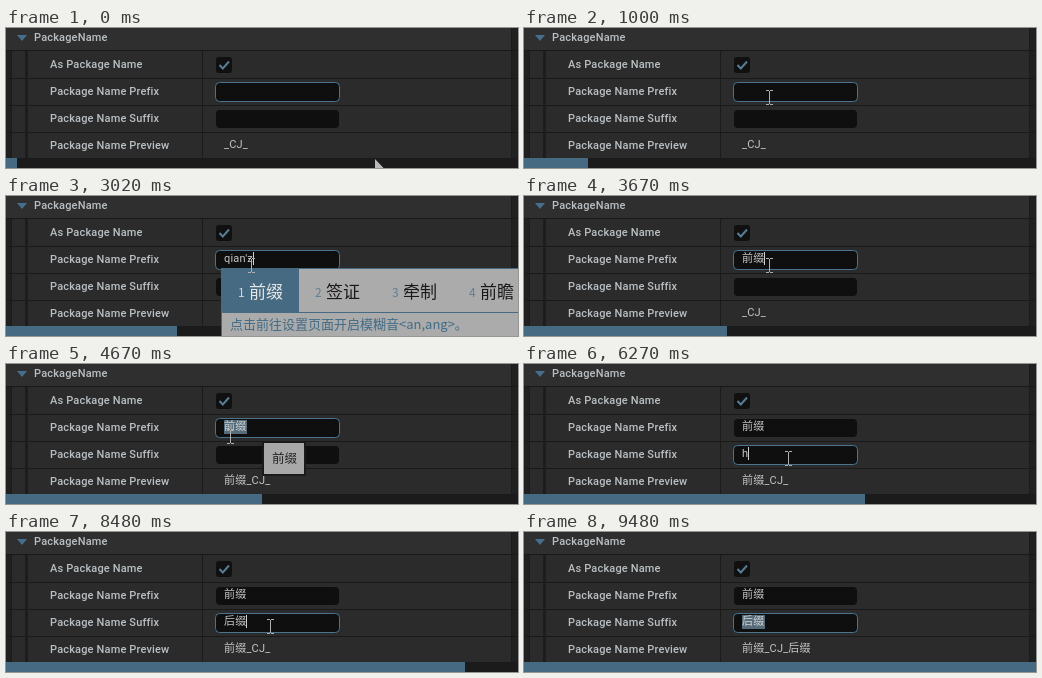
Recreate the animation shown at these times as an HTML page with a canvas. Size 512 by 140 pixels, loop 9680 ms.

```html
<!DOCTYPE html>
<html lang="zh-CN">
<head>
<meta charset="utf-8">
<title>PackageName</title>
<style>
html, body { margin: 0; width: 512px; height: 140px; overflow: hidden; background: #1b1b1b; }
canvas { display: block; }
</style>
</head>
<body>
<canvas id="stage" width="512" height="140"></canvas>
<script>
const ctx = document.getElementById('stage').getContext('2d');
const UI = 'Roboto, "Noto Sans CJK SC", "Noto Sans CJK", sans-serif';
const HAN = '"Noto Sans CJK SC", "Noto Sans CJK", sans-serif';
const BLUE = '#456a82';
const STEPS = 48;

// Screen updates come every 200 ms, apart from a few slower ones.
const slow = { 9: 210, 11: 210, 15: 250, 37: 210 };
const starts = [];
let loop = 0;
for (let i = 0; i < STEPS; i++) {
  starts.push(loop);
  loop += slow[i] || 200;
}

// [first step, typed text, candidates]
const prefixKeys = [
  [0, ''], [10, 'q'],
  [11, 'qi', '其 起 期 气'],
  [12, 'qia', '恰 卡 掐 洽'],
  [13, 'qian', '前 钱 千 签'],
  [15, "qian'z", '前缀 签证 牵制 前瞻'],
  [16, "qian'zh", '前缀 签证 牵制 前瞻'],
  [17, "qian'zhui", '前缀 前 钱 千'],
  [18, '前缀']
];
const suffixKeys = [
  [0, ''], [31, 'h'],
  [32, 'ho', '后 或 好 和'],
  [33, 'hou', '后 候 厚 猴'],
  [34, "hou'z", '后者 后缀 后置 候诊'],
  [35, "hou'zh", '后者 后缀 后置 候诊'],
  [38, "hou'zhu", '后主 后注 后缀 厚主'],
  [39, "hou'zhui", '后缀 后坠 后追 厚坠'],
  [41, '后缀']
];
// [step, x, y] of the mouse
const path = [[0, 369, 131], [1, 366, 126], [5, 245, 69], [20, 245, 69], [22, 224, 72],
  [24, 224, 72], [27, 264, 94], [47, 264, 94]];

const at = (keys, n) => keys.filter(k => k[0] <= n).pop();

function mouseAt(n) {
  const i = Math.max(0, path.findIndex(p => p[0] > n) - 1);
  const [a, b] = [path[i], path[i + 1]];
  const u = (n - a[0]) / (b[0] - a[0]);
  const e = u * u * (3 - 2 * u);
  return [a[1] + (b[1] - a[1]) * e, a[2] + (b[2] - a[2]) * e].map(Math.round);
}

function rect(x, y, w, h, fill) {
  ctx.fillStyle = fill;
  ctx.fillRect(x, y, w, h);
}

function round(x, y, w, h, r, fill, stroke) {
  ctx.beginPath();
  ctx.roundRect(x, y, w, h, r);
  ctx.fillStyle = fill;
  ctx.fill();
  if (stroke) {
    ctx.strokeStyle = stroke;
    ctx.lineWidth = 1;
    ctx.stroke();
  }
}

function shape(points, fill) {
  ctx.beginPath();
  points.forEach(([x, y]) => ctx.lineTo(x, y));
  ctx.closePath();
  ctx.fillStyle = fill;
  ctx.fill();
}

function text(s, x, y, color = '#b9bfc3', font = '500 11px ' + UI, gap = 0.16) {
  ctx.font = font;
  ctx.letterSpacing = gap + 'px';
  ctx.fillStyle = color;
  ctx.fillText(s, x, y);
  return ctx.measureText(s).width;
}

const han = (s, x, y, color, size) => text(s, x, y, color, size + 'px ' + HAN, 0);
const value = (s, x, y, color = '#c6c6c6') => text(s, x, y, color, '11px ' + UI, 0.2);

function panel() {
  rect(0, 0, 512, 140, '#1b1b1b');
  rect(0, 0, 505, 22, '#2f2f2f');
  rect(0, 23, 505, 107, '#2b2b2b');
  rect(0, 23, 5, 107, '#202020');
  rect(506, 0, 6, 130, '#202020');
  for (const y of [22, 50, 77, 104]) rect(0, y, 512, 1, '#191919');
  rect(5, 23, 1, 107, '#1b1b1b');
  rect(19, 23, 3, 107, '#1d1d1d');
  rect(196, 23, 1, 107, '#1b1b1b');
  shape([[11, 7], [21, 7], [16, 13]], '#456f8a');
  text('PackageName', 28, 13);
  ['As Package Name', 'Package Name Prefix', 'Package Name Suffix', 'Package Name Preview']
    .forEach((s, i) => text(s, 44, 40 + 27 * i));

  round(210, 29, 16, 16, 3, '#101010');
  ctx.beginPath();
  ctx.moveTo(213.5, 37);
  ctx.lineTo(216.8, 40.5);
  ctx.lineTo(223, 33.5);
  ctx.strokeStyle = '#567d94';
  ctx.lineWidth = 2;
  ctx.stroke();
}

function field(y, typed, focus, caret, selected) {
  if (focus) round(209.5, y + 0.5, 124, 19, 4, '#0f0f0f', '#4a748e');
  else round(210, y + 1, 123, 18, 4, '#0f0f0f');
  if (selected) rect(218, y + 2, 23, 14, '#566c7a');
  const w = value(typed, 218, y + 12, selected ? '#d2d2d2' : undefined);
  if (caret) rect(Math.round(218 + w), y + 2, 1, 13, '#d0d0d0');
}

function popup(y, words) {
  rect(215, y, 297, 140 - y, '#ababab');
  let x = 232;
  words.split(' ').forEach((word, i) => {
    const step = 44 + 16.5 * word.length;
    if (!i) rect(215, y, step + 1, 44, BLUE);
    han(i + 1, x, y + 29, i ? '#5f7f94' : '#d0d8dd', 12);
    han(word, x + 11, y + 29.5, i ? '#1a1a1a' : '#e6e6e6', 17);
    x += step;
  });
  rect(215, y, 297, 1, BLUE);
  rect(215, y + 44, 297, 1, BLUE);
  rect(215, y, 1, 140 - y, BLUE);
  han('点击前往设置页面开启模糊音<an,ang>。', 224, y + 61, '#426b86', 13);
}

function tooltip() {
  rect(256, 77, 44, 35, '#1a1a1a');
  rect(258, 79, 40, 31, '#a8a8a8');
  han('前缀', 266, 99, '#222', 12.5);
}

function pointer(x, y, beam) {
  if (beam) {
    rect(x, y - 6, 1, 13, '#b0b0b0');
    for (const dy of [-7, 7]) {
      rect(x - 3, y + dy, 3, 1, '#b0b0b0');
      rect(x + 1, y + dy, 3, 1, '#b0b0b0');
    }
  } else {
    shape([[x, y], [x, y + 15], [x + 3.5, y + 12], [x + 6, y + 17], [x + 8, y + 16],
      [x + 6, y + 11], [x + 10, y + 10.5]], '#b9b9b9');
  }
}

function draw(n) {
  const [, prefix, words1] = at(prefixKeys, n);
  const [, suffix, words2] = at(suffixKeys, n);
  const onSuffix = n >= 28;
  const chosen = n >= 20 && !onSuffix;
  const done = n >= 46;
  const idle = n < 10 || (n >= 28 && n < 31);
  const caret = idle ? n > 5 && n % 4 > 1 : n !== 36 && n !== 37;

  panel();
  field(54, prefix, !onSuffix, !onSuffix && !chosen && caret, chosen);
  field(81, suffix, onSuffix, onSuffix && !done && caret, done);
  value((n >= 20 ? '前缀' : '') + '_CJ_' + (n >= 47 ? '后缀' : ''), 218, 120);
  rect(0, 130, Math.round((n + 1) * 512 / STEPS), 10, BLUE);
  if (words1) popup(72, words1);
  if (words2) popup(99, words2);
  if (n === 23) tooltip();
  if (!done) {
    const [x, y] = mouseAt(n);
    const inside = x > 209 && x < 333 && y > 53 && y < 100;
    pointer(x, y, inside);
  }
}

let shown = -1;
function tick() {
  const t = performance.now() % loop;
  let n = STEPS - 1;
  while (starts[n] > t) n--;
  if (n !== shown) draw(shown = n);
  requestAnimationFrame(tick);
}
tick();
</script>
</body>
</html>
```
